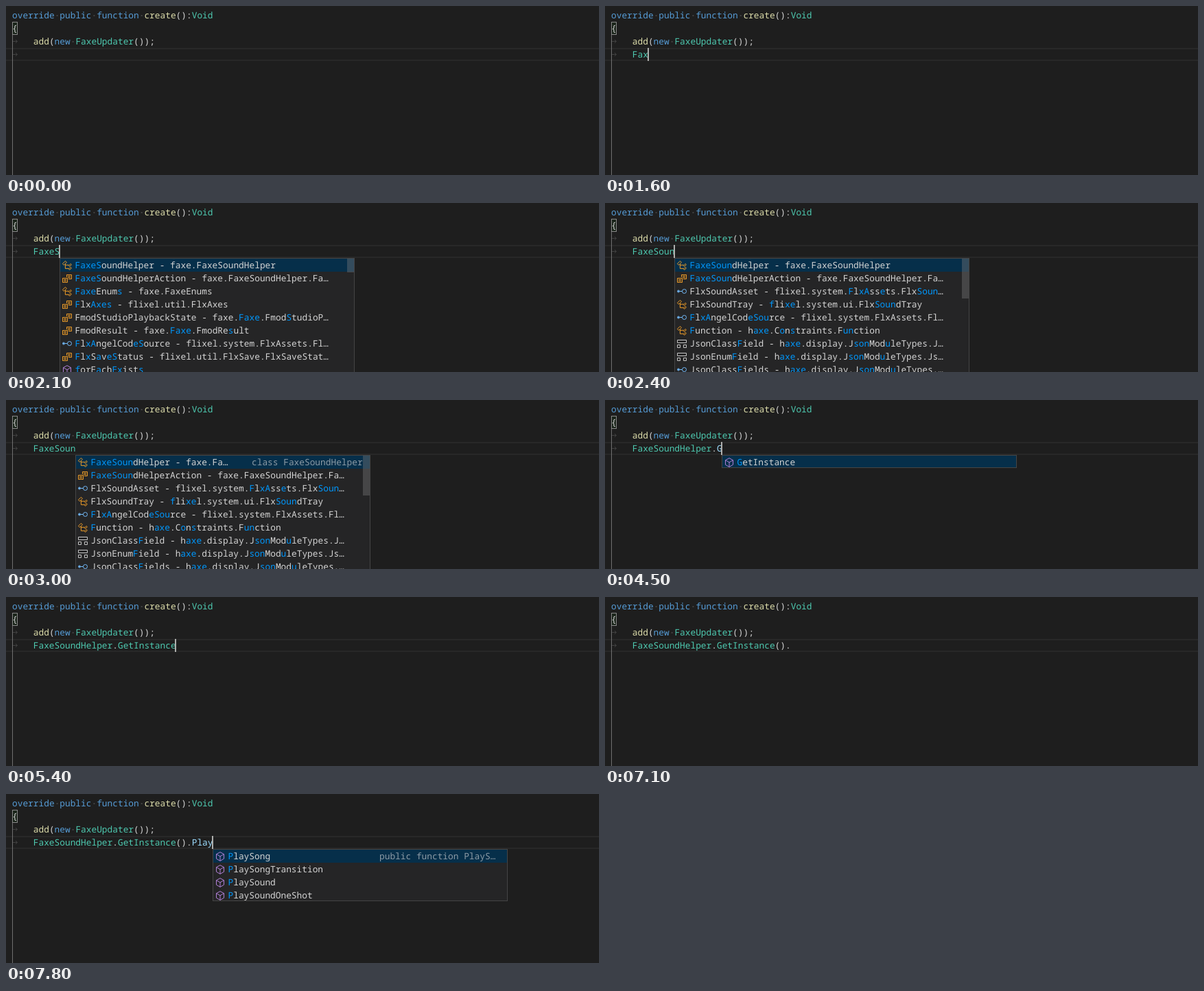
Recreate the animation shown at these times as an HTML page. Size 864x246 px, loop 8000 ms.

```html
<!DOCTYPE html>
<html lang="en">
<head>
<meta charset="utf-8">
<title>Code completion</title>
<style>
  html, body { margin: 0; width: 100%; height: 100%; overflow: hidden; background: #1e1e1e; }
  svg { display: block; width: 864px; height: 246px; }
  text {
    font: 12.83px "Noto Sans Mono", "DejaVu Sans Mono", monospace;
    white-space: pre;
    text-rendering: geometricPrecision;
  }
  .icon { fill: none; stroke-width: 1; }
</style>
</head>
<body>
<svg id="stage" viewBox="0 0 864 246"></svg>
<script>
const LOOP = 8000, CHAR = 7.697, LINE = 19, LEFT = 9, POPUP_WIDTH = 430;
const COLOR = {
  plain: '#d4d4d4', keyword: '#569cd6', call: '#dcdcaa', type: '#4ec9b0',
  member: '#9cdcfe', faint: '#414141', match: '#0097fb', detail: '#8d9ba6'
};

// Each icon: stroke colour and path in a 16px box.
const ICONS = {
  c: ['#ee9d28', 'M5.4 1.4l2 2-4 4-2-2zM5.4 6v6.4h5M5.4 7.3h5M13 5.4l1.4 1.3-2.7 2.7-1.3-1.4zM13 10.4l1.4 1.3-2.7 2.7-1.3-1.4z'],
  e: ['#ee9d28', 'M7.5 6V2.5h7v6H10M9 4.5h4M9 6.5h4M1.5 7.5h7v6h-7zM3 9.5h4M3 11.5h4'],
  i: ['#75beff', 'M8.5 7.5a3 3 0 1 0 6 0a3 3 0 1 0-6 0M5 7.5h3.5M1.5 7.5a1.5 1.5 0 1 0 3 0a1.5 1.5 0 1 0-3 0M2 7.5h2'],
  m: ['#b180d7', 'M8 1.6l5.5 3v6.6L8 14.4l-5.5-3.2V4.6zM2.5 4.6L8 7.7l5.5-3.1M8 7.7v6.7'],
  t: ['#c5c5c5', 'M1.5 2.5h13v4h-13zM1.5 9.5h4v4h-4zM10.5 9.5h4v4h-4z'],
  s: ['#c5c5c5', 'M2.5 10V2.5h11V10M2 13.5h2M6 13.5h1.5M9 13.5h1.5M12 13.5h2']
};

// First letter picks the icon, [ ] marks matched letters.
const LISTS = {
  faxe: [
    'c[FaxeS]oundHelper - faxe.FaxeSoundHelper',
    'e[FaxeS]oundHelperAction - faxe.FaxeSoundHelper.Fa…',
    'c[Faxe]Enum[s] - faxe.FaxeEnums',
    'e[F]lx[Axes] - flixel.util.FlxAxes',
    'eFmodStudioPlaybackState - faxe.[Faxe].Fmod[S]tudioP…',
    'eFmodResult - faxe.[Faxe].FmodRe[s]ult',
    'i[F]l[xA]ngelCod[eS]ource - flixel.system.FlxAssets.Fl…',
    'e[F]l[x]S[a]v[eS]tatus - flixel.util.FlxSave.FlxSaveStat…',
    'm[f]orE[a]ch[Ex]ist[s]'
  ],
  sound: [
    'c[FaxeS]oundHelper - faxe.FaxeSoundHelper',
    'e[FaxeS]oundHelperAction - faxe.FaxeSoundHelper.Fa…',
    'iFlxSoundAsset - flixel.system.[F]l[xA]ss[e]ts.Flx[Soun]…',
    'cFlxSoundTray - [f]li[xe]l.system.ui.Flx[Soun]dTray',
    'i[F]l[xA]ngelCod[eSou]rce - flixel.system.FlxAssets.Fl…',
    'c[F]unction - h[axe].C[o]n[s]traints.F[un]ction',
    'tJsonClass[F]ield - h[axe].display.J[son]Mod[u]leTypes.J…',
    'tJsonEnum[F]ield - h[axe].display.J[son]Mod[u]leTypes.Js…',
    'iJsonClass[F]ields - h[axe].display.J[son]Mod[u]leTypes.…'
  ],
  statics: ['mGetInstance', 'sfinal', 'sfor', 'sif', 'sprint', 'sreturn', 'sswitch', 'svar', 'swhile'],
  get: ['m[G]etInstance'],
  members: [
    'mGetEventParameterOnSound', 'mIsSongPlaying', 'mIsSoundPlaying', 'mPauseSong', 'mPlaySong',
    'mPlaySongTransition', 'mPlaySound', 'mPlaySoundOneShot', 'mSetEventParameterOnSound'
  ],
  p: ['m[P]laySong', 'm[P]laySongTransition', 'm[P]laySound', 'm[P]laySoundOneShot', 'm[P]auseSong', 's[p]rint', 'mSto[p]Song'],
  play: ['m[P]laySong', 'm[P]laySongTransition', 'm[P]laySound', 'm[P]laySoundOneShot']
};
const SCROLL = { faxe: 20, sound: 58, statics: 110, members: 100 };

const HELPER = 'FaxeSoundHelper', GET = HELPER + '.GetInstance', CALL = GET + '().';
const CLASS_INFO = ['class ' + HELPER, 257];
const GET_INFO = ['public static functio…', 243];
const PLAY_INFO = ['public function PlayS…', 243];

// start ms, typed text, caret shown, list, detail of the selected row
const STEPS = [
  [0, '', 0], [500, '', 1], [1000, '', 0],
  [1200, 'F', 1], [1400, 'Fa', 1], [1600, 'Fax', 1], [1800, 'Faxe', 1],
  [1900, 'Faxe', 1, 'faxe'], [2100, 'FaxeS', 1, 'faxe'],
  [2200, 'FaxeSo', 1, 'sound'], [2300, 'FaxeSou', 1, 'sound'], [2400, 'FaxeSoun', 1, 'sound'],
  [2500, 'FaxeSoun', 1, 'sound', CLASS_INFO], [3000, 'FaxeSoun', 0, 'sound', CLASS_INFO],
  [3100, HELPER, 1], [3600, HELPER, 0], [3800, HELPER + '.', 1], [4200, HELPER + '.', 0],
  [4300, HELPER + '.', 0, 'statics'], [4500, HELPER + '.G', 1, 'get'],
  [4800, HELPER + '.Get', 1, 'get', GET_INFO], [5300, HELPER + '.Get', 0, 'get', GET_INFO],
  [5400, GET, 1], [5800, GET, 0], [6200, GET + '()', 1],
  [6700, CALL, 1], [7100, CALL, 0], [7200, CALL, 0, 'members'],
  [7300, CALL + 'P', 1, 'p'], [7600, CALL + 'Pl', 1, 'play', PLAY_INFO],
  [7700, CALL + 'Pla', 1, 'play', PLAY_INFO], [7800, CALL + 'Play', 1, 'play', PLAY_INFO]
];

const rect = (x, y, w, h, fill, extra = '') =>
  `<rect x="${x}" y="${y}" width="${w}" height="${h}" fill="${fill}" ${extra}/>`;

// parts: [text, colour] pairs set one after another
const runs = (x, y, parts) => `<text x="${x}" y="${y}">` +
  parts.map(([text, fill]) => `<tspan fill="${fill}">${text}</tspan>`).join('') + '</text>';

const column = n => LEFT + n * CHAR;
const caretX = n => Math.floor(8.3 + n * CHAR);
const bracket = (col, top) =>
  rect(Math.floor(column(col)) + .5, top + .5, 7, 18, 'rgba(0,100,0,.1)', 'stroke="#888"');
const dot = (col, y) => rect(column(col) + 3, y, 2, 2, COLOR.faint);
const tabArrow = y => `<path d="M10 ${y}h6.5m-2.5-2.5l2.5 2.5-2.5 2.5" fill="none" stroke="${COLOR.faint}"/>`;

const { plain, keyword, call, type } = COLOR;
const BACKDROP = rect(0, 0, 864, 246, '#1e1e1e') +
  rect(0, 61, 864, 2, '#282828') + rect(0, 78, 864, 2, '#282828') +
  rect(9, 42, 1, 204, '#707070') +
  [8, 15, 24].map(col => dot(col, 13)).join('') + dot(11, 51) +
  tabArrow(51.5) + tabArrow(70.5) +
  runs(LEFT, 18, [['override public function ', keyword], ['create', call], ['():', plain], ['Void', type]]) +
  runs(column(4), 56, [['add', call], ['(', plain], ['new ', keyword], ['FaxeUpdater', type], ['());', plain]]);

function codeParts(typed) {
  let afterCall = false;
  return (typed.match(/\w+|\W+/g) || []).map(token => {
    if (/\W/.test(token)) {
      afterCall = token.includes(')');
      return [token, plain];
    }
    return [token, afterCall || /^[A-Z]$/.test(token) ? COLOR.member : type];
  });
}

// Fit the leading highlight to the number of letters typed so far.
const fitMatch = (label, count) => label.replace(/^\[(FaxeS|P(?=la)|G)\](\w*)/, (_, head, tail) => {
  const word = head + tail;
  return `[${word.slice(0, count)}]${word.slice(count)}`;
});

const matchParts = label => label.split(/[[\]]/).map((text, i) => [text, i % 2 ? COLOR.match : plain]);

function popup(name, left, count, detail) {
  const items = LISTS[name], height = items.length > 8 ? 200 : items.length * LINE;
  let out = rect(left, 80, POPUP_WIDTH, height, '#252526') +
    rect(left + 1, 81, POPUP_WIDTH - 2, Math.min(LINE, height - 2), '#062f4a');
  items.forEach((item, i) => {
    const top = 81 + i * LINE, [stroke, path] = ICONS[item[0]];
    let label = fitMatch(item.slice(1), count);
    if (!i && detail === CLASS_INFO) label = label.replace('faxe.' + HELPER, 'faxe.Fa…');
    out += `<path class="icon" stroke="${stroke}" transform="translate(${left + 3} ${top + 2})" d="${path}"/>` +
      runs(left + 22.5, top + 14, matchParts(label));
  });
  if (detail) out += runs(left + detail[1], 95, [[detail[0], COLOR.detail]]);
  if (SCROLL[name]) out += rect(left + POPUP_WIDTH - 11, 81, 10, SCROLL[name], 'rgba(121,121,121,.4)');
  return out + rect(left + .5, 80.5, POPUP_WIDTH - 1, height - 1, 'none', 'stroke="#454545"');
}

function picture([, typed, caret, list, detail]) {
  const end = 4 + typed.length, x = caretX(end);
  const pair = typed.endsWith(')') ? bracket(end - 2, 61) + bracket(end - 1, 61) : bracket(0, 23);
  return BACKDROP + pair +
    runs(LEFT, 37, [['{', plain]]) +
    runs(column(4), 75, codeParts(typed)) +
    (caret ? rect(x, 61, 2, LINE, '#aeafad') : '') +
    (list ? popup(list, x + 1, typed.split('.').pop().length, detail) : '');
}

const stage = document.getElementById('stage');
const start = performance.now();
let shown;
function draw() {
  const time = (performance.now() - start) % LOOP;
  const step = STEPS.findLast(([from]) => from <= time);
  if (step !== shown) {
    stage.innerHTML = picture(step);
    shown = step;
  }
  requestAnimationFrame(draw);
}
draw();
</script>
</body>
</html>
```
